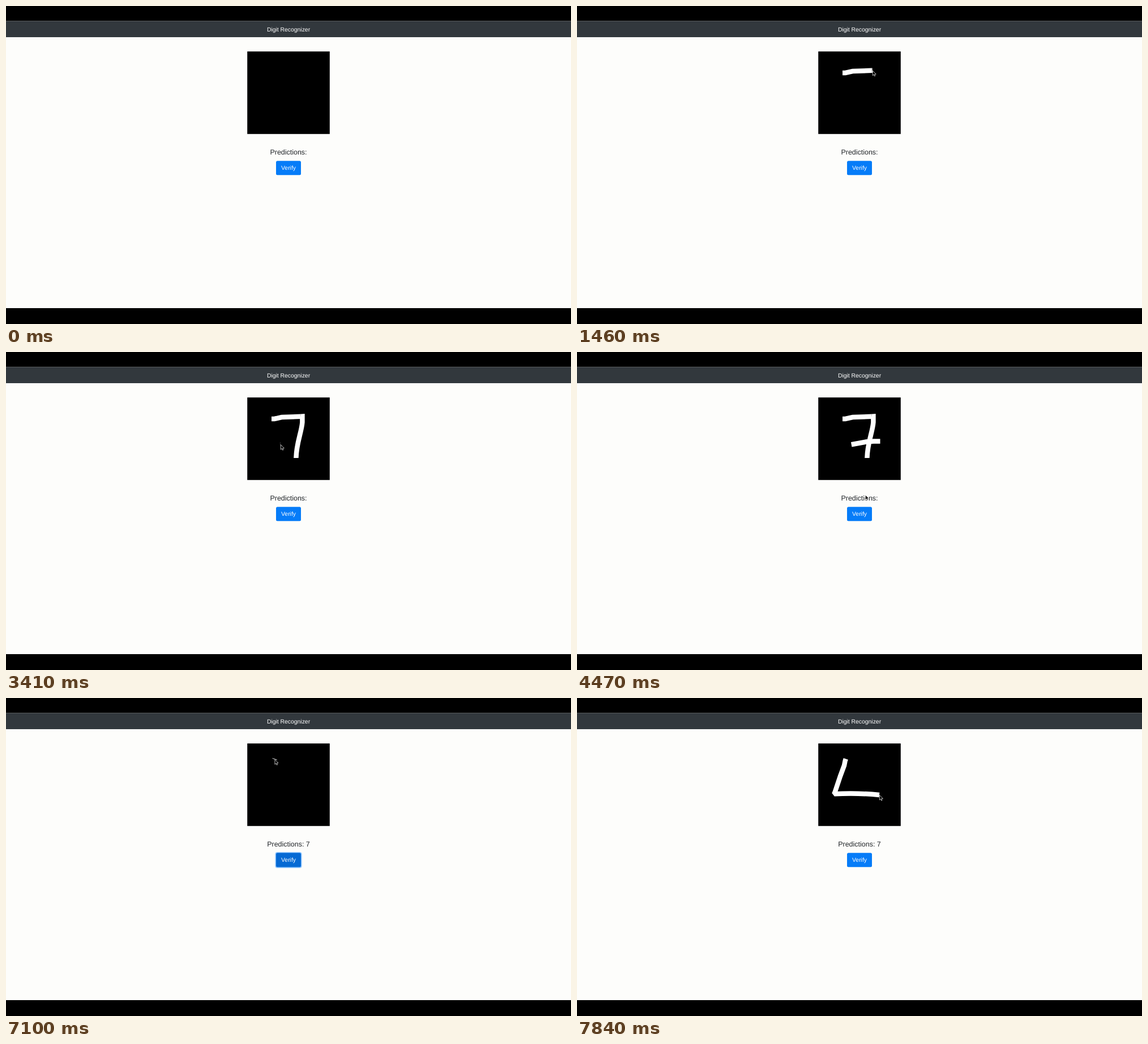
Write an HTML page that moves like this. It is 998 px wide and 561 px high and loops after 8 s.

```html
<!DOCTYPE html>
<html lang="en">
<head>
<meta charset="utf-8">
<title>Digit Recognizer</title>
<style>
  html, body { margin: 0; width: 100%; height: 100%; overflow: hidden; background: #000; }
  svg { display: block; width: 100%; height: 100%; }
  text { font-family: "Liberation Sans", Arial, sans-serif; text-anchor: middle; text-rendering: geometricPrecision; }
  #strokes { fill: none; stroke-width: 8.5; stroke-miterlimit: 1.5; }
  .pointer { fill: #000; stroke: #fff; stroke-width: .7; stroke-linejoin: round; }
</style>
</head>
<body>
<svg viewBox="0 0 998 561">
  <rect width="998" height="561"/>
  <rect y="26.5" width="998" height="506.5" fill="#fdfdfb"/>
  <rect y="26.5" width="998" height="28.5" fill="#32383d"/>
  <text x="499" y="44.7" font-size="10.4" fill="#fff">Digit Recognizer</text>
  <rect x="426.2" y="80.2" width="145.6" height="145.6"/>
  <g id="strokes"></g>
  <text id="result" x="499" y="262" font-size="12.48" fill="#212529">Predictions:</text>
  <rect id="ring" x="475.4" y="271.7" width="47.2" height="28.2" rx="4" fill="#92c7ff"/>
  <rect id="button" x="477" y="273.3" width="44" height="25" rx="2.5"/>
  <text x="499" y="289.4" font-size="10.4" fill="#fff">Verify</text>
  <g id="cursor">
    <path id="arrow" class="pointer" d="M.4 .4V8.9L2.4 7.2 3.7 10 5 9.4 3.8 6.7 6.4 6.5Z"/>
    <path id="hand" class="pointer" d="M-1 .8Q0-.4 1 .8V4L4.6 5V8L3.6 10.5H-1.5L-4 6.6-3 5.6-1 7Z"/>
  </g>
</svg>
<script>
const LOOP = 8000, APPEAR = 350, PRESS = 5380, RELEASE = 5460, BLUR = 7120, FADE = 150;

const linear = k => k;
const easeIn = k => k ** 4;
const easeOut = k => 1 - (1 - k) ** 4;

const find = id => document.getElementById(id);
const [strokes, result, ring, button, cursor, arrow, hand] =
  ['strokes', 'result', 'ring', 'button', 'cursor', 'arrow', 'hand'].map(find);
const show = (el, on) => el.setAttribute('visibility', on ? 'visible' : 'hidden');
const ramp = (t, start, length = FADE) => Math.min(1, Math.max(0, (t - start) / length));

// One leg of the pointer's way; it leaves ink until the wipe time, if one is given.
function leg(start, end, ease, d, wipe = 0) {
  const path = document.createElementNS('http://www.w3.org/2000/svg', 'path');
  path.setAttribute('d', d);
  path.setAttribute('stroke', wipe ? '#fff' : 'none');
  strokes.append(path);
  const length = path.getTotalLength();
  const reach = t => length * ease(ramp(t, start, end - start));
  return { start, wipe, path, length, reach };
}

const legs = [
  leg(620, 1390, easeOut, 'M469 118H474L487 115 520.7 113.8', RELEASE),
  leg(1450, 2210, linear, 'M520.7 113.8L523.4 113.6V124C522 142 513 160 512.4 187', RELEASE),
  leg(2610, 3220, linear, 'M512.4 187L484.7 163.2'),
  leg(3410, 3670, linear, 'M484.7 163.2L512 158.2 524 157.4H535.5', RELEASE),
  leg(4330, 4850, easeOut, 'M535.5 157.4L498.5 289'),
  leg(PRESS, 5530, linear, 'M498.5 289V294'),
  leg(5950, 6730, linear, 'M498.5 294L474.8 107.4'),
  leg(6950, 7400, easeIn, 'M474.8 107.4L473.6 111 472 119 465 138 454.5 169.3', LOOP),
  leg(7550, 7840, linear, 'M455.5 166.3L454.5 169.3Q494 167 534 171', LOOP)
];

function draw(t) {
  for (const { start, wipe, path, length, reach } of legs) {
    show(path, t > start && t < wipe);
    path.setAttribute('stroke-dasharray', `${reach(t)} ${length + 1}`);
  }

  const current = legs.findLast(({ start }) => t >= start) || legs[0];
  const { x, y } = current.path.getPointAtLength(current.reach(t));
  const overButton = y > 273;
  cursor.setAttribute('transform', `translate(${x} ${y})`);
  show(arrow, t >= APPEAR && !overButton);
  show(hand, overButton);

  const blur = ramp(t, BLUR);
  const dark = ramp(t, 4600) - blur;
  button.setAttribute('fill', `rgb(6,${124 - 18 * dark},${248 - 36 * dark})`);
  ring.setAttribute('opacity', ramp(t, PRESS) - blur);
  result.textContent = t < RELEASE ? 'Predictions:' : 'Predictions: 7';
}

const begin = performance.now();
function tick() {
  draw((performance.now() - begin) % LOOP);
  requestAnimationFrame(tick);
}
tick();
</script>
</body>
</html>
```
